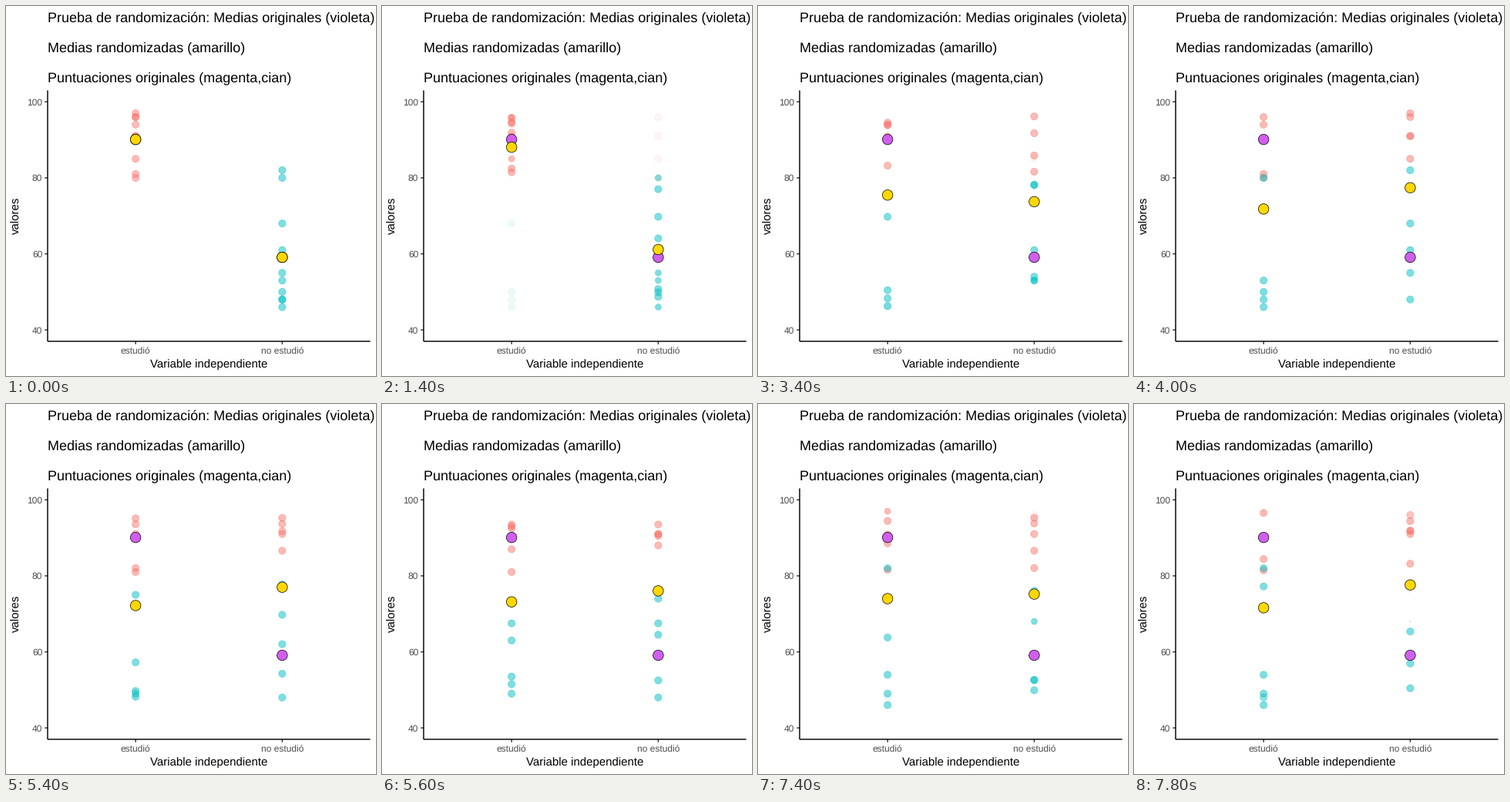
Recreate the animation shown at these times as a matplotlib script. Size 480x480 px, loop 8 s.

```python
import math
from itertools import zip_longest

import matplotlib.pyplot as plt
from matplotlib.animation import FuncAnimation
from matplotlib.patches import Circle

SIZE, DPI = 480, 72
LEFT, RIGHT, TOP, BOTTOM = 54, 472.5, 109.5, 435
PINK, CYAN, GOLD, VIOLET = "#F8766D", "#00BFC4", "#FFD700", "#D15FEE"
STROKE = 0.71
HOLD, MOVE = 7, 3
CYCLE = HOLD + MOVE

# Scores of each group per shuffle; equal list positions move into each other.
STUDIED_PINK = [
    [97, 96, 94, 91, 81, 80, 96, 91, 90, 85],
    [81, 94, 96, 97, 91, 90],
    [96, 94, 81, 80, 90],
    [90, 91, 81, 94, 97],
    [80, 90, 85, 97],
]
STUDIED_CYAN = [
    [],
    [68, 50, 48, 46],
    [80, 53, 50, 48, 46],
    [46, 82, 48, 55, 61],
    [46, 82, 55, 48, 80, 48],
]
IDLE_PINK = [
    [],
    [96, 91, 85, 80],
    [97, 96, 91, 91, 85],
    [85, 80, 96, 91, 96],
    [96, 94, 81, 91, 91, 96],
]
IDLE_CYAN = [
    [82, 68, 61, 50, 48, 48, 80, 55, 53, 46],
    [48, 80, 82, 55, 61, 53],
    [82, 68, 55, 48, 61],
    [53, 80, 50, 48, 68],
    [50, 53, 68, 61],
]


def x_px(pos):
    return LEFT + (pos - 0.4) / 2.2 * (RIGHT - LEFT)


def y_px(value):
    return BOTTOM - (value - 37) / 66 * (BOTTOM - TOP)


def mix(a, b, w):
    return a + (b - a) * w


def radius(size, stroke=0.5):
    """Radius in pixels of a plot symbol with the given size in mm."""
    return 0.375 * (size * 72.27 / 25.4 + stroke * 1.89)


plt.rcParams["font.family"] = "Liberation Sans"
plt.rcParams["text.hinting"] = "none"

fig = plt.figure(figsize=(SIZE / DPI, SIZE / DPI), dpi=DPI, facecolor="white")
ax = fig.add_axes([0, 0, 1, 1])
ax.set_xlim(0, SIZE)
ax.set_ylim(SIZE, 0)
ax.axis("off")


def label(x, y, text, size, color="black", ha="left", **kw):
    ax.text(x, y, text, fontsize=size, color=color, ha=ha,
            va=kw.pop("va", "baseline"), **kw)


def line(xs, ys, color="black"):
    ax.plot(xs, ys, color=color, lw=1.455, solid_capstyle="butt", snap=False)


def draw_frame():
    title = ("Prueba de randomización: Medias originales (violeta),",
             "Medias randomizadas (amarillo)",
             "Puntuaciones originales (magenta,cian)")
    for y, text in zip((20, 59, 98), title):
        label(LEFT, y, text, 18)
    for value in (40, 60, 80, 100):
        y = y_px(value)
        line([LEFT - 3.75, LEFT], [y, y], "#333333")
        label(47.25, y + 4.3, str(value), 12, "#4D4D4D", "right")
    for pos, text in ((1, "estudió"), (2, "no estudió")):
        x = x_px(pos)
        line([x, x], [BOTTOM, BOTTOM + 3.75], "#333333")
        label(x, 451, text, 12, "#4D4D4D", "center")
    line([LEFT, LEFT], [TOP, BOTTOM])
    line([LEFT, RIGHT], [BOTTOM, BOTTOM])
    label((LEFT + RIGHT) / 2, 469, "Variable independiente", 15, ha="center")
    label(18.3, (TOP + BOTTOM) / 2, "valores", 15, ha="right", va="center",
          rotation=90, rotation_mode="default")
    # Anchor the rotated title on its baseline.
    text = ax.texts[-1]
    text.set(ha="center", va="baseline", rotation_mode="anchor")


draw_frame()
dots = []


def dot(pos, value, r, face, edge, lw, alpha=1.0):
    c = Circle((x_px(pos), y_px(value)), r, fc=face, ec=edge, lw=lw,
               alpha=alpha, zorder=5)
    dots.append(ax.add_patch(c))


def draw_scores(pos, states, color, step, w):
    pairs = zip_longest(states[step], states[step + 1])
    for a, b in pairs:
        scale, alpha = 1, 0.5
        if a is None:
            value, alpha = b, 0.5 * w
        elif b is None:
            value, scale = a, 1 - w
        else:
            value = mix(a, b, w)
        if alpha > 0:
            dot(pos, value, radius(4 * scale, 0.5 * scale), color, color,
                STROKE * scale, alpha)


def mean(groups, step):
    scores = [v for g in groups for v in g[step]]
    return sum(scores) / len(scores)


def update(i):
    while dots:
        dots.pop().remove()
    step, k = divmod(i, CYCLE)
    t = max(0, k - HOLD + 1) / (MOVE + 1)
    w = (1 - math.cos(math.pi * t)) / 2

    order = [(1, STUDIED_PINK, PINK), (2, IDLE_PINK, PINK),
             (1, STUDIED_CYAN, CYAN), (2, IDLE_CYAN, CYAN)]
    if step < 2:
        order.reverse()
    for pos, states, color in order:
        draw_scores(pos, states, color, step, w)

    sides = [(1, (STUDIED_PINK, STUDIED_CYAN)), (2, (IDLE_PINK, IDLE_CYAN))]
    for pos, groups in sides:
        dot(pos, mean(groups, 0), radius(6), VIOLET, "black", STROKE)
    for pos, groups in sides:
        value = mix(mean(groups, step), mean(groups, step + 1), w)
        dot(pos, value, radius(6), GOLD, "black", STROKE)
    return dots


anim = FuncAnimation(fig, update, frames=4 * CYCLE, interval=200,
                     init_func=lambda: [], repeat=True, repeat_delay=0)
plt.show()
```
